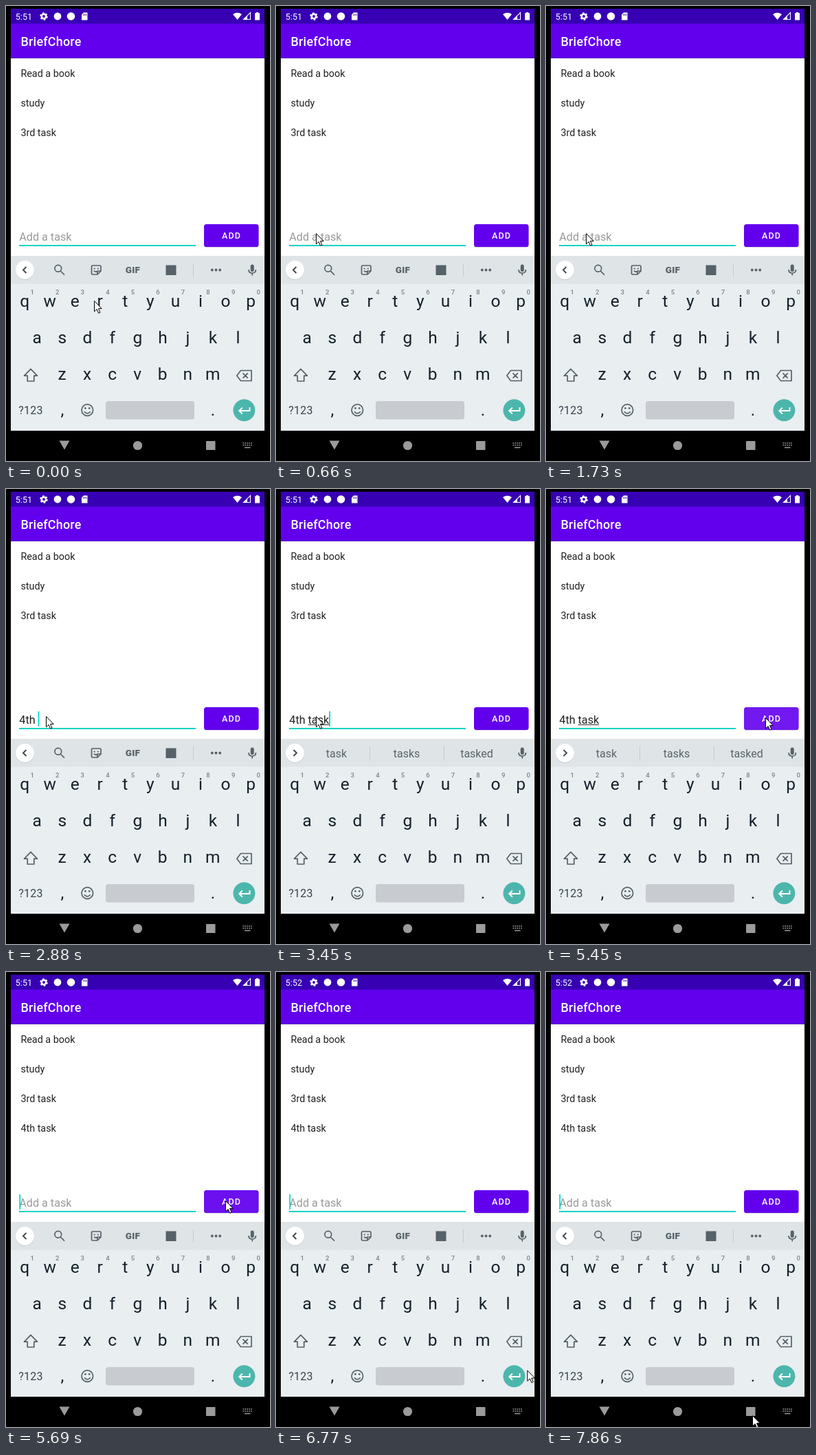
Recreate the animation shown at these times as an HTML page. Size 384x661 px, loop 8000 ms.

```html
<!DOCTYPE html>
<html lang="en">
<head>
<meta charset="utf-8">
<title>To-do app</title>
<style>
  html, body { margin: 0; width: 100%; height: 100%; overflow: hidden; background: #000; }
  svg { display: block; width: 384px; height: 661px; font-family: Roboto, "Noto Sans", sans-serif; }
  text { white-space: pre; }
  .mid { text-anchor: middle; }
  .item { font-size: 14.37px; fill: #212121; }
  .entry { font-size: 16.17px; }
  .key { font-size: 24.5px; fill: #14202a; text-anchor: middle; }
  .hint { font-size: 9.5px; font-weight: 500; fill: #7d858a; text-anchor: middle; }
  .word { font-size: 16px; fill: #596469; text-anchor: middle; }
  .line { fill: none; stroke: #566267; stroke-width: 1.7; }
  .solid { fill: #566267; }
  #chevron { stroke: #414b50; stroke-width: 2; }
</style>
</head>
<body>
<svg viewBox="0 0 384 661">
  <rect width="384" height="661"/>
  <rect x="7" y="4" width="369" height="22" fill="#3700b3"/>
  <rect x="7" y="76" width="369" height="287" fill="#fff"/>
  <rect x="7" y="25.6" width="369" height="50.2" fill="#6200ee"/>

  <!-- status bar -->
  <g fill="#fff">
    <text id="clock" x="13.8" y="19.6" font-size="12.57"></text>
    <circle cx="55" cy="15" r="3.2" fill="none" stroke="#fff" stroke-width="2.6"/>
    <circle cx="55" cy="15" r="5" fill="none" stroke="#fff" stroke-width="1.6" stroke-dasharray="2.6 2.636"/>
    <circle cx="75" cy="15" r="5.4"/>
    <circle cx="94.5" cy="15" r="5.8"/>
    <path d="M113 9.5H118.5V20.5H110V12.5Z"/>
    <path d="M112.8 11.5V14M114.8 11.5V14M116.8 11.5V14" stroke="#3700b3" stroke-width=".9"/>
    <path d="M330 12Q336.5 7.5 343 12L336.5 20Z"/>
    <path d="M345.5 19.5L355.5 9.5V19.5Z" fill="none" stroke="#fff" stroke-width="1.1"/>
    <path d="M345 20L351 14V20Z"/>
    <path d="M364 9H367V10.3H369V20.5H362V10.3H364Z"/>
  </g>
  <text x="21.5" y="57.5" font-size="17.96" font-weight="500" letter-spacing=".22" fill="#fff">BriefChore</text>

  <g id="list"></g>

  <!-- entry row -->
  <rect x="19" y="347" width="257" height="2" fill="#0bd3c3"/>
  <text id="hint" class="entry" x="19.3" y="340.5" fill="#9a9a9a">Add a task</text>
  <text id="typed" class="entry" x="19.3" y="340.5" fill="#212121"></text>
  <path id="underline" stroke="#333"/>
  <rect id="caret" y="323" width="1.8" height="22" fill="#03dac5"/>
  <rect x="288" y="318" width="79.5" height="33" rx="4" fill="#000" opacity=".14"/>
  <rect x="288" y="317" width="79.5" height="33" rx="3.6" fill="#6200ee"/>
  <rect id="ripple" x="288" y="317" width="79.5" height="33" rx="3.6" fill="#fff"/>
  <text x="314" y="338.3" font-size="12.57" font-weight="500" letter-spacing="1.12" fill="#fff">ADD</text>

  <!-- keyboard -->
  <rect x="7" y="363" width="369" height="254" fill="#e9eef1"/>
  <rect x="7" y="363" width="369" height="40.5" fill="#dfe4e7"/>
  <circle cx="27.5" cy="384.3" r="13.7" opacity=".1"/>
  <circle cx="27.5" cy="383.5" r="13.5" fill="#fff"/>
  <path id="chevron" fill="none"/>
  <g id="tools">
    <g class="line">
      <circle cx="75.8" cy="381.3" r="4.9"/>
      <path d="M79.3 385L85 390.7"/>
      <path d="M126 377H136.5Q138 377 138 378.5V385L133 390H126Q124.500 390 124.5 388.5V378.5Q124.5 377 126 377ZM138 385H133V390M128 384.5Q130 387 132.5 385.5"/>
      <path d="M272.5 374V393" stroke="#c5cacd" stroke-width="1"/>
    </g>
    <g class="solid">
      <circle cx="128.7" cy="381.5" r="1.1"/><circle cx="133.8" cy="381.5" r="1.1"/>
      <text class="mid" x="184.5" y="388.3" font-size="13.5" font-weight="900" letter-spacing=".3">GIF</text>
      <rect x="232.5" y="376.5" width="15" height="14.5"/>
      <circle cx="299.8" cy="383.5" r="1.9"/><circle cx="305.5" cy="383.5" r="1.9"/><circle cx="311.2" cy="383.5" r="1.9"/>
    </g>
  </g>
  <g id="suggestions">
    <path d="M136.5 374V394M244.5 374V394" stroke="#c5cacd"/>
    <text class="word" x="88" y="390"></text>
    <text class="word" x="190" y="390"></text>
    <text class="word" x="292" y="390"></text>
  </g>
  <rect class="solid" x="355.7" y="375.5" width="5" height="10.5" rx="2.5"/>
  <path class="line" d="M353 383Q353 388 358.2 388T363.4 383M358.2 388V391.5"/>
  <g id="keys"></g>
  <g class="line">
    <path d="M36 527.3L45.5 537.2H40.8V545H31.2V537.2H26.5Z" stroke-linejoin="round"/>
    <path d="M341.5 529.5H357V544.5H341.5L335.8 537ZM344.5 533.3L351.8 540.7M351.8 533.3L344.5 540.7" stroke-linejoin="round"/>
    <circle cx="118.3" cy="587" r="8.3"/>
    <path d="M113.8 589.2Q118.3 594.5 122.8 589.2"/>
  </g>
  <g class="solid"><circle cx="115.4" cy="584.3" r="1.4"/><circle cx="121.2" cy="584.3" r="1.4"/></g>
  <text class="mid" x="36" y="592.8" font-size="16" fill="#38454c" letter-spacing=".2">?123</text>
  <rect x="145" y="574" width="129" height="26.5" rx="3.5" fill="#c8ccd0"/>
  <circle cx="346.4" cy="587.3" r="16" fill="#4db6ac"/>
  <path d="M354.5 583V588H339.5M343.8 583.5L339.2 588L343.8 592.5" fill="none" stroke="#fff" stroke-width="1.9"/>

  <!-- navigation bar -->
  <g fill="#9b9b9b">
    <path d="M77.500 631.500H92.500L85 644.500Z"/>
    <circle cx="191.5" cy="638.5" r="6.6"/>
    <rect x="291" y="632" width="13.5" height="13" rx=".8"/>
    <path d="M344.5 635H358M344.5 638H358" stroke="#9b9b9b" stroke-width="1.7" stroke-dasharray="1.7 1.2"/>
    <path d="M347 641.5H355.5" stroke="#9b9b9b" stroke-width="1.5"/>
  </g>
  <path id="pointer" d="M.5 .5V15.8L4.1 12.5L6.6 18.2L9 17.2L6.5 11.6H11.2Z" fill="#fff" stroke="#000"/>
</svg>
<script>
const LOOP = 8000, TEXT_X = 19.3, BLINK = 510, SAMPLE = 130;
const TASK = '4th task', PRESSED = 5450, ADDED = 5570, NEXT_MINUTE = 6650;

const $ = id => document.getElementById(id);
const show = (el, on) => el.style.display = on ? '' : 'none';
const label = (cls, x, y, s) => `<text class="${cls}" x="${x}" y="${y}">${s}</text>`;

const easeOut = p => 1 - (1 - p) ** 2;
const easeSoft = p => p - Math.sin(2 * Math.PI * p) / 20;

// Each sweep is a quadratic curve that begins where the previous one ended.
const pointerStart = [128, 428];
const sweeps = [
  { start: 150, end: 660, via: [85, 338], to: [58, 330] },
  { start: 3880, end: 4000, via: [66, 331], to: [82, 332] },
  { start: 4150, end: 4510, via: [190, -20], to: [272, 205] },
  { start: 4660, end: 5020, via: [290, 324], to: [319, 332] },
  { start: 5840, end: 6080, via: [321, 336], to: [326, 343] },
  { start: 6230, end: 6890, via: [415, 472], to: [352, 613], ease: easeSoft },
  { start: 7040, end: 7460, via: [314, 675], to: [300, 644] }
];

function pointerAt(t) {
  let from = pointerStart;
  for (const { start, end, via, to, ease = easeOut } of sweeps) {
    if (t < start) break;
    const gaps = Math.round((end - start) / SAMPLE);
    const hop = Math.floor((t - start) / (end - start) * gaps) + 1;
    const e = ease(Math.min(1, hop / (gaps + 1)));
    from = from.map((a, i) => (1 - e) ** 2 * a + 2 * e * (1 - e) * via[i] + e * e * to[i]);
  }
  return from;
}

// A slow start, then a steady burst.
const keyTime = i => i < 3 ? 2170 + 280 * i : 2880 + 142 * (i - 3);
const keyTimes = [...TASK].map((_, i) => keyTime(i));

const suggestionSets = {
  t: ['t', 'to', 'the'], ta: ['ta', 'take', 'tax'],
  tas: ['tas', 'task', 'TAS'], task: ['task', 'tasks', 'tasked']
};

$('list').innerHTML = ['Read a book', 'study', '3rd task', TASK]
  .map((s, i) => label('item', 21.4, 103 + 43 * i, s)).join('');
const newItem = $('list').lastChild;

const keyRow = (letters, x, y, cls = 'key') =>
  [...letters].map((c, i) => label(cls, x + 36.55 * i, y, c)).join('');
$('keys').innerHTML = keyRow('qwertyuiop', 27.1, 437) + keyRow('asdfghjkl', 45.2, 490) +
  keyRow('zxcvbnm', 81.5, 543) + keyRow(',', 82, 595) + keyRow('.', 301, 595) +
  keyRow('1234567890', 38.2, 419.3, 'hint');

const words = $('suggestions').querySelectorAll('text');

function render(t) {
  $('pointer').setAttribute('transform', `translate(${pointerAt(t)})`);

  const added = t >= ADDED;
  const struck = keyTimes.filter(time => time <= t).length;
  const text = added ? '' : TASK.slice(0, struck);
  const composing = text.slice(4);
  const typed = $('typed');
  typed.textContent = text;
  const end = TEXT_X + (text ? typed.getComputedTextLength() : 0);
  const start = composing ? TEXT_X + typed.getSubStringLength(0, 4) : end;
  $('underline').setAttribute('d', composing ? `M${start} 342.5H${end}` : '');
  show($('hint'), !text);

  // The blink restarts with every edit.
  const lastEdit = added ? ADDED : struck ? keyTimes[struck - 1] : 150 - 2 * BLINK;
  $('caret').setAttribute('x', end);
  show($('caret'), Math.floor((t - lastEdit) / BLINK) % 2 === 0);

  show($('tools'), !composing);
  show($('suggestions'), composing);
  (suggestionSets[composing] || []).forEach((word, i) => words[i].textContent = word);
  $('chevron').setAttribute('d', composing ? 'M25.5 379L30 383.5L25.5 388' : 'M29.5 379L25 383.5L29.5 388');

  show(newItem, added);
  $('ripple').setAttribute('opacity', t < PRESSED ? 0 : Math.max(0, .1 - (t - PRESSED) / 6300));
  $('clock').textContent = t < NEXT_MINUTE ? '5:51' : '5:52';
}

const began = performance.now();
function tick() {
  render((performance.now() - began) % LOOP);
  requestAnimationFrame(tick);
}
tick();
</script>
</body>
</html>
```
